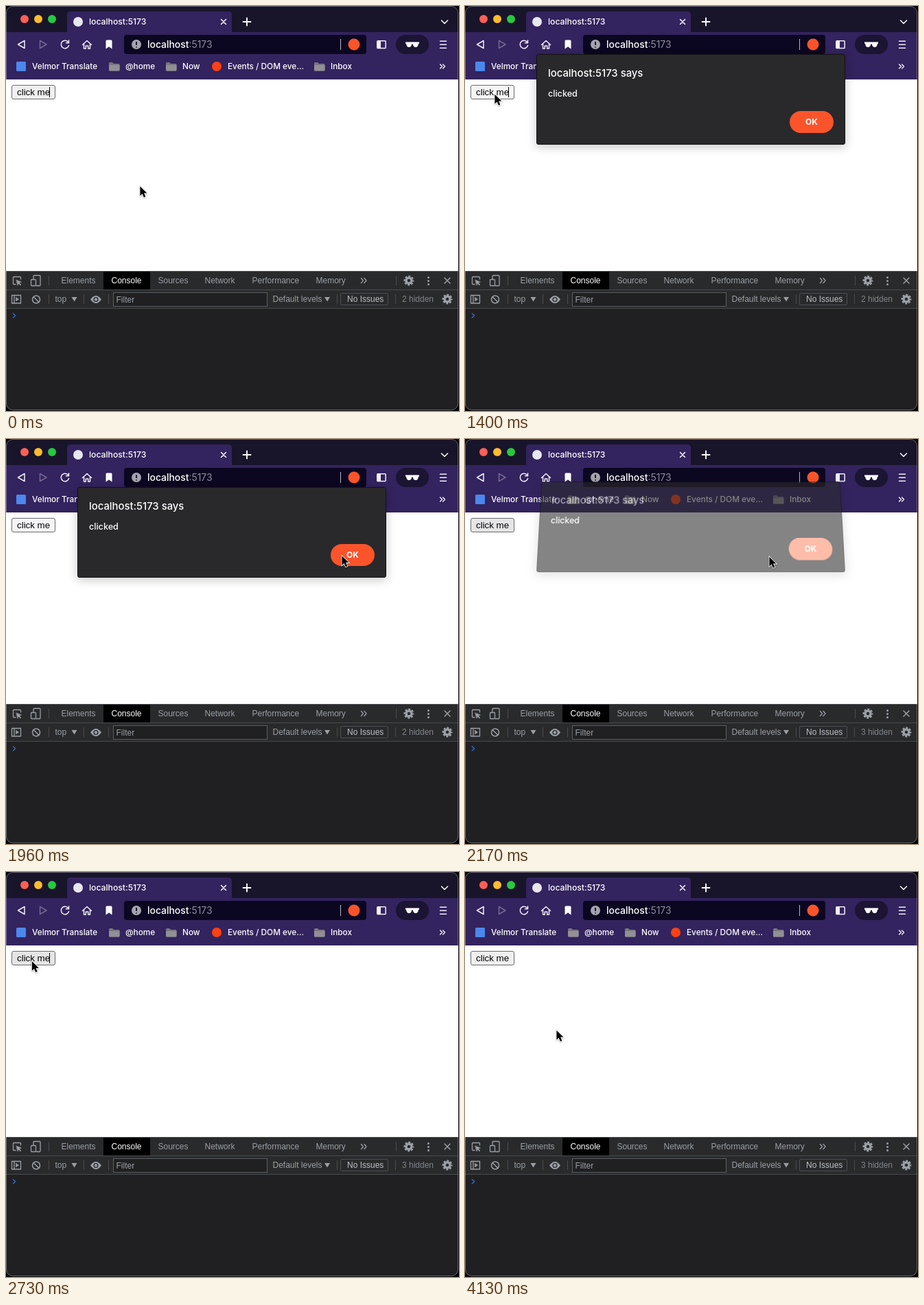
Write an HTML page that moves like this. It is 660 by 590 pixels and loops after 4.2 s.

```html
<!DOCTYPE html>
<html lang="en">
<head>
<meta charset="utf-8">
<title>Click once</title>
<style>
  html, body { margin: 0; width: 100%; height: 100%; overflow: hidden; background: #000; }
  #stage { position: relative; width: 660px; height: 590px; overflow: hidden; }
  svg { position: absolute; left: 0; top: 0; display: block; }
  text { white-space: pre; }
  .ui { font-family: Inter, sans-serif; font-weight: 500; fill: #fff; }
  .dev { font: 12px "Liberation Sans", Arial, sans-serif; fill: #9aa0a6; }
  .line { fill: none; stroke-linecap: round; stroke-linejoin: round; }
  #dialog {
    position: absolute; left: 104px; top: 70px; width: 450px; height: 132px;
    box-sizing: border-box; background: #29292b; border: 1px solid #111; border-radius: 3px;
    box-shadow: 0 3px 14px 1px rgba(0, 0, 0, .2); transform-origin: 50% 100%;
  }
  #cursor { overflow: visible; filter: drop-shadow(0 1px 1px rgba(0, 0, 0, .3)); }
</style>
</head>
<body>
<div id="stage">
  <svg width="660" height="590" viewBox="0 0 660 590">
    <defs>
      <clipPath id="window"><rect width="659" height="589" rx="10"/></clipPath>
      <g id="folder">
        <path d="M0 1.5Q0 0 1.5 0H5L7 2H14Q15.500 2 15.500 3.500V11Q15.500 12.500 14 12.500H1.500Q0 12.500 0 11Z" fill="#77747d"/>
        <path d="M0 4H15.500V11Q15.500 12.500 14 12.500H1.500Q0 12.500 0 11Z" fill="#929095"/>
      </g>
      <g id="gear" fill="none" stroke="#9aa0a6">
        <circle r="4" stroke-width="3.400"/>
        <circle r="6.300" stroke-width="2.400" stroke-dasharray="2.900 2.048" stroke-dashoffset="1.450"/>
      </g>
    </defs>

    <g clip-path="url(#window)">
      <rect width="660" height="590" fill="#18152a"/>
      <path d="M0 38H89V13Q89 8 94 8H324Q329 8 329 13V38H660V107H0Z" fill="#33235e"/>
      <rect y="107" width="659" height="279" fill="#fff"/>
      <rect y="386" width="660" height="54" fill="#292a2c"/>
      <rect y="440" width="660" height="150" fill="#202022"/>
      <path d="M0 386.500H660M0 413.500H660M0 440.500H660" stroke="#494b4f"/>
      <rect x="142" y="387" width="68" height="26" fill="#000"/>
    </g>
    <rect x=".5" y=".5" width="658" height="588" rx="9.500" fill="none" stroke="#fff" stroke-opacity=".32"/>

    <!-- tab strip -->
    <circle cx="27" cy="19" r="6" fill="#ff5f57"/>
    <circle cx="47" cy="19" r="6" fill="#febc2e"/>
    <circle cx="67" cy="19" r="6" fill="#28c840"/>
    <circle cx="105" cy="23" r="7" fill="#e9e7ee"/>
    <text class="ui" x="121" y="27" font-size="12.200">localhost:5173</text>
    <g class="line" stroke="#fff" stroke-width="1.500">
      <path d="M313.500 19.500L320.500 26.500M320.500 19.500L313.500 26.500"/>
      <path d="M345.500 23H356.500M351 17.500V28.500" stroke-width="1.900"/>
      <path d="M634.500 21L639 25.500 643.500 21"/>
    </g>

    <!-- toolbar -->
    <rect x="172" y="42" width="353" height="28" rx="4" fill="#0c0720"/>
    <rect x="568" y="42" width="48" height="28" rx="14" fill="#1b1432"/>
    <g class="line" stroke="#f2f0f7" stroke-width="1.500">
      <path d="M27 50.500V61.500L17.500 56Z"/>
      <path d="M49.500 50.500V61.500L59 56Z" stroke="#756a94"/>
      <path d="M90.500 52.500A5.700 5.700 0 1 0 91.500 57.500M91.500 50V53.700H87.500"/>
      <path d="M111.500 56.500L118 50.500 124.500 56.500M113.500 55V62H116.300V58H119.700V62H122.500V55"/>
      <rect x="540.800" y="50.800" width="12.400" height="10.800" rx="1.200"/>
      <path d="M632.500 51.200H641.500M632.500 56.200H641.500M632.500 61.200H641.500"/>
    </g>
    <path d="M541 51H546V61.500H541Z" fill="#f2f0f7"/>
    <path d="M145.500 51Q145.500 49.500 147 49.500H153Q154.500 49.500 154.500 51V62.500L150 59.300 145.500 62.500Z" fill="#fff"/>
    <circle cx="190" cy="56" r="7" fill="#a5a3ad"/>
    <path d="M190 52V57M190 59.200V60.400" stroke="#0c0720" stroke-width="1.800"/>
    <text class="ui" x="206" y="61" font-size="13.900">localhost<tspan fill="#918da0" font-weight="400">:5173</tspan></text>
    <path d="M487.500 48V64" stroke="#b8b5c2"/>
    <circle cx="507" cy="56" r="8.500" fill="#fb542b"/>
    <path d="M582 52.500H602V54.500L600.800 55.200Q600.500 60 596.800 60 593.500 60 592.800 55.500H591.200Q590.500 60 587.200 60 583.500 60 583.200 55.200L582 54.500Z" fill="#fff"/>

    <!-- bookmarks -->
    <rect x="15" y="81" width="14" height="14" rx="1.500" fill="#4b87ec"/>
    <use href="#folder" x="150" y="82"/>
    <use href="#folder" x="233" y="82"/>
    <use href="#folder" x="449" y="82"/>
    <circle cx="307" cy="88" r="7" fill="#ff4010"/>
    <g class="ui" font-size="11.800">
      <text x="38" y="92">Velmor Translate</text>
      <text x="174" y="92">@home</text>
      <text x="257" y="92">Now</text>
      <text x="323" y="92">Events / DOM eve…</text>
      <text x="473" y="92">Inbox</text>
    </g>
    <path class="line" d="M632.500 85L635.500 88 632.500 91M636.500 85L639.500 88 636.500 91" stroke="#fff" stroke-width="1.300"/>

    <!-- page -->
    <rect id="button" x="8.500" y="115.500" width="63" height="20" rx="2.500" stroke="#6b6b6b"/>
    <text x="16" y="130" font-family="Liberation Sans, Arial, sans-serif" font-size="13.333">click me</text>
    <path id="caret" d="M63.500 118V133" stroke="#000"/>

    <!-- developer tools -->
    <g id="labels" class="dev"></g>
    <path d="M62.500 393V407M568.500 393V407M62.500 420V434M113.500 420V434M149.500 420V434M482.500 420V434M567.500 420V434" stroke="#494c50"/>
    <g class="line" stroke="#9aa0a6" stroke-width="1.300">
      <path d="M14 405.500H11.500Q10.500 405.500 10.500 404.500V395.500Q10.500 394.500 11.500 394.500H20.500Q21.500 394.500 21.500 395.500V398"/>
      <path d="M15 399L22.500 402 19.300 403.300 22 406 21 407 18.300 404.200 17 407Z" fill="#9aa0a6" stroke-width=".5"/>
      <path d="M40 398V393.500Q40 392.500 41 392.500H49Q50 392.500 50 393.500V406.500Q50 407.500 49 407.500H44"/>
      <rect x="36.500" y="398.500" width="7" height="9" rx="1"/>
      <path d="M517.500 396.500L520.500 400 517.500 403.500M522 396.500L525 400 522 403.500"/>
      <path d="M639 396L647 404M647 396L639 404" stroke-width="1.500"/>
      <rect x="8.500" y="421.500" width="13" height="11.500"/>
      <path d="M12 421.500V433"/>
      <path d="M14.500 424.500V430L18.500 427.200Z" fill="#9aa0a6" stroke-width=".5"/>
      <circle cx="44" cy="427.500" r="5.500" stroke-width="1.500"/>
      <path d="M40.200 423.700L47.800 431.300" stroke-width="1.500"/>
      <path d="M10.300 448L13.800 451 10.300 454" stroke="#3570d4"/>
    </g>
    <path d="M95.500 424H103.500L99.500 430.500ZM464 424H472L468 430.500Z" fill="#9aa0a6"/>
    <path d="M123 427.500Q131 416.500 139 427.500 131 438.500 123 427.500Z" fill="#9aa0a6"/>
    <circle cx="131" cy="427.500" r="2.900" fill="#9aa0a6" stroke="#292a2c" stroke-width="1.400"/>
    <rect x="156.500" y="417.500" width="224" height="20" fill="#202022" stroke="#5b5e62"/>
    <text class="dev" x="160.500" y="432">Filter</text>
    <rect x="487.500" y="418.500" width="69" height="17" rx="1.500" fill="none" stroke="#4c4f53"/>
    <text class="dev" x="497" y="431" style="fill:#bdc1c6">No Issues</text>
    <text class="dev" id="hidden" x="577" y="431" style="fill:#80868b"></text>
    <use href="#gear" x="587" y="400"/>
    <use href="#gear" x="643" y="427"/>
    <g fill="#9aa0a6">
      <circle cx="615.500" cy="395.500" r="1.500"/>
      <circle cx="615.500" cy="400.500" r="1.500"/>
      <circle cx="615.500" cy="405.500" r="1.500"/>
    </g>
  </svg>

  <div id="dialog">
    <svg width="448" height="130" viewBox="105 71 448 130">
      <text class="ui" x="121" y="103" font-size="14.850">localhost:5173 says</text>
      <text class="ui" x="121" y="132" font-size="12.600">clicked</text>
      <rect id="ok" x="473" y="153" width="64" height="32" rx="16"/>
      <text class="ui" x="505" y="173" font-size="12" text-anchor="middle" style="font-weight:700">OK</text>
    </svg>
  </div>

  <svg id="cursor" width="12" height="18">
    <path d="M.4 .7V14.400L3.600 11.500 5.900 16.700 8.300 15.700 6.100 10.600H10.400Z" fill="#000" stroke="#fff" stroke-width="1.600" paint-order="stroke"/>
  </svg>
</div>

<script>
const LOOP = 4200, STEP = 70;
const $ = id => document.getElementById(id);

const labels = [
  ["Elements", 80.5, 404], ["Console", 153.5, 404, "#fff"], ["Sources", 221.5, 404],
  ["Network", 289.5, 404], ["Performance", 358.5, 404], ["Memory", 451.5, 404],
  ["top", 71.5, 431], ["Default levels", 388.5, 431]
];
$("labels").innerHTML = labels.map(([label, x, y, color = "#9aa0a6"]) =>
  `<text x="${x}" y="${y}" style="fill:${color}">${label}</text>`).join("");

// time, x, y of the pointer tip
const path = [
  [0, 195, 262], [280, 195, 262], [630, 164, 203], [910, 117, 125],
  [1120, 43, 128], [1400, 43, 128], [1540, 204, 152], [1820, 490, 168],
  [2100, 488, 171], [2170, 443, 171], [2310, 75, 159], [2520, 38, 130],
  [3220, 36, 128], [3500, 36, 128], [3780, 78, 176], [4060, 133, 230], [4200, 133, 230]
];

// time, value: each value holds until the next row
const tilt = [[0, null], [1260, 1.6], [1330, .6], [1400, 0], [2100, .4], [2170, 1], [2240, 1.8], [2310, null]];
const caret = [[0, 1], [70, 0], [560, 1], [1050, 0], [1190, 1], [1890, 0], [2310, 1], [2800, 0], [3290, 1], [3780, 0]];
const NORMAL = "#efefef", HOVER = "#e5e5e5", ACTIVE = "#f5f5f5";
const button = [
  [0, NORMAL], [1050, HOVER], [1190, ACTIVE], [2100, HOVER], [2660, ACTIVE],
  [2730, HOVER], [2940, ACTIVE], [3010, HOVER], [3640, NORMAL]
];
const ok = [[0, "#fb542b"], [2030, "#fb8c69"]];

const hold = (table, t) => table.findLast(row => row[0] <= t)[1];

function pointer(t) {
  const next = Math.max(1, path.findIndex(row => row[0] > t));
  const [t0, x0, y0] = path[next - 1], [t1, x1, y1] = path[next];
  const k = (t - t0) / (t1 - t0);
  return [x0 + (x1 - x0) * k, y0 + (y1 - y0) * k];
}

function draw(t) {
  const [x, y] = pointer(t);
  $("cursor").style.transform = `translate(${x}px, ${y}px)`;
  $("button").setAttribute("fill", hold(button, t));
  $("ok").setAttribute("fill", hold(ok, t));
  $("caret").style.opacity = hold(caret, t);
  $("hidden").textContent = (t < 2100 ? 2 : 3) + " hidden";

  const k = hold(tilt, t), style = $("dialog").style;
  style.visibility = k === null ? "hidden" : "visible";
  style.opacity = 1 - .42 * k;
  style.transform = k
    ? `translateY(${-8 * k}px) perspective(1000px) scaleY(${1 + .07 * k}) rotateX(${15 * k}deg)`
    : "none";
}

const start = performance.now();
function tick() {
  const t = (performance.now() - start) % LOOP;
  draw(Math.floor(t / STEP) * STEP);
  requestAnimationFrame(tick);
}
tick();
</script>
</body>
</html>
```
